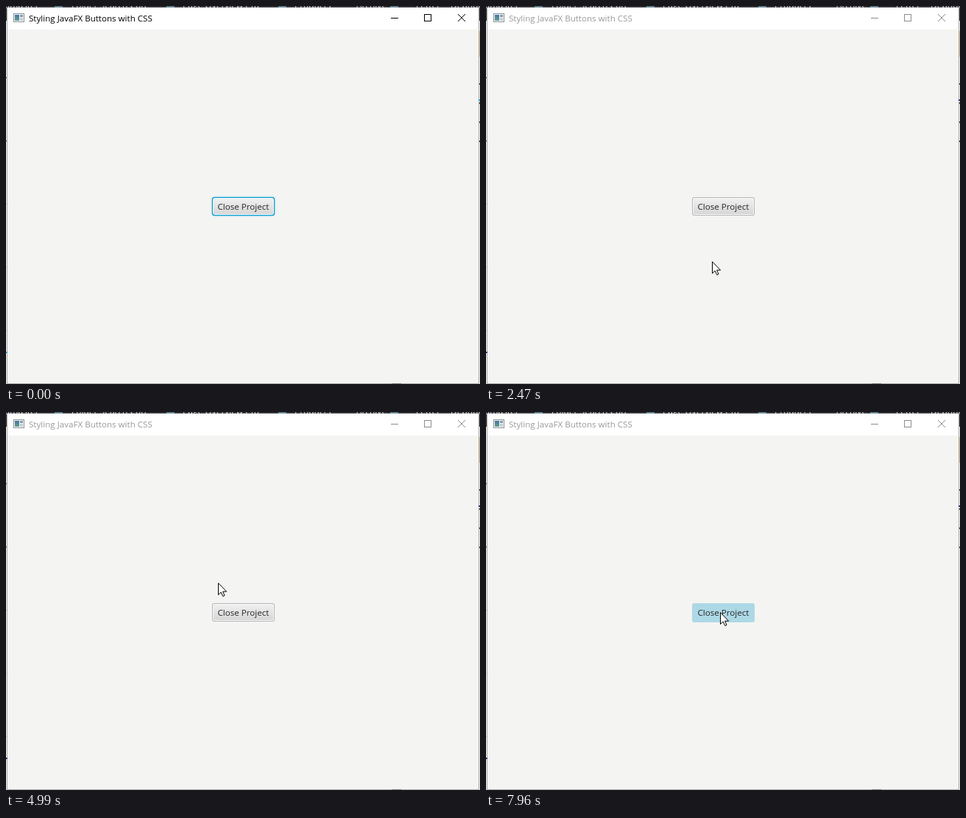
Animation, 644 px wide and 514 px high, one loop 7990 ms. Source, as an HTML page:

```html
<!DOCTYPE html>
<html lang="en">
<head>
<meta charset="utf-8">
<title>Styling JavaFX Buttons with CSS</title>
<style>
  html, body { margin: 0; width: 100%; height: 100%; overflow: hidden; background: #f4f4f2; }
  svg { display: block; width: 644px; height: 514px; font: 11.6px "Open Sans", "Noto Sans", sans-serif; }
  .title { fill: #999; }
  .controls { fill: none; stroke: #8c8c8c; }
  .focused .title { fill: #000; }
  .focused .controls { stroke: #000; }
  .accent { fill: #27467c; }
  .focused .accent { fill: #2aa5dc; }
  .ring, .hover { visibility: hidden; }
  .focused .ring, .over .hover { visibility: visible; }
  .over .plain { visibility: hidden; }
  .label { fill: #262626; }
  .behind { font-size: 12px; fill: #d6d6d6; }
</style>
</head>
<body>
<svg id="stage" class="focused" viewBox="0 0 644 514">
  <defs>
    <linearGradient id="face" x2="0" y2="1">
      <stop offset="0" stop-color="#f0f0f0"/>
      <stop offset="1" stop-color="#d6d6d6"/>
    </linearGradient>
    <linearGradient id="pane" x2="0" y2="1">
      <stop offset="0" stop-color="#3f73a6"/>
      <stop offset="1" stop-color="#5fa48f"/>
    </linearGradient>
  </defs>

  <!-- page behind the window -->
  <rect width="644" height="514" fill="#f1f1f1"/>
  <rect width="644" height="20" fill="#35363a"/>
  <g class="behind">
    <text x="-2" y="3">omaster</text>
    <text x="89" y="3">Folder Search Con</text>
    <text x="240" y="3">Page Overviews To</text>
    <text x="392" y="3">Products</text>
    <text x="476" y="3">Archive</text>
    <text x="557" y="3">Letter</text>
    <text x="604" y="3">Dephone</text>
  </g>
  <path d="M66 1h480" stroke="#62808f" stroke-width="2" stroke-dasharray="11 141"/>
  <rect x="642" y="34" width="2" height="35" fill="#d9bd91"/>

  <!-- window -->
  <rect x="1" y="2" width="642" height="512" fill="#aaa"/>
  <rect x="2" y="2" width="640" height="30" fill="#fff"/>
  <rect x="2" y="32" width="640" height="481" fill="#f4f4f2"/>
  <rect x="524" y="513" width="13" height="1" fill="#777"/>

  <!-- slivers of the page at the edges -->
  <path d="M.5 97V200" stroke="#333" stroke-dasharray="1 85"/>
  <path d="M.5 269V442" stroke="#bbb" stroke-dasharray="1 85"/>
  <path d="M643.5 105V200" stroke="#333" stroke-dasharray="2 24"/>
  <rect class="accent" x="642" y="127" width="2" height="2"/>
  <rect class="accent" y="470" width="2" height="2"/>

  <!-- title bar -->
  <rect x="10.5" y="10.5" width="14" height="11" fill="#f5f7f8" stroke="#8b9196"/>
  <rect x="12" y="12" width="6" height="8" fill="url(#pane)"/>
  <rect x="19" y="12" width="4" height="3" fill="#8c9aa5"/>
  <rect x="19" y="16" width="4" height="4" fill="#c5cdd2"/>
  <text class="title" x="31" y="21">Styling JavaFX Buttons with CSS</text>
  <g class="controls">
    <path d="M523 16.5h10"/>
    <rect x="568.5" y="11.5" width="9" height="9"/>
    <path d="M614 11l10 10M624 11l-10 10"/>
  </g>

  <!-- button -->
  <g class="plain">
    <rect x="280" y="260" width="85" height="25" rx="3" fill="#b5b5b5"/>
    <rect x="281" y="261" width="83" height="23" rx="2" fill="#fafafa"/>
    <rect x="282" y="262" width="81" height="21" rx="1" fill="url(#face)"/>
  </g>
  <g class="ring" fill="none" stroke="#039ed3" stroke-width="1.2">
    <rect x="279.2" y="259.2" width="86.6" height="26.6" rx="4" stroke-opacity=".13"/>
    <rect x="280.4" y="260.4" width="84.2" height="24.2" rx="3"/>
  </g>
  <rect class="hover" x="280" y="260" width="85" height="26" rx="3" fill="#add8e6"/>
  <text class="label" x="287.5" y="277">Close Project</text>

  <path id="pointer" d="M.5 .7V16.6L4.2 13.1L6.7 18.6L9 17.6L6.6 12.2H11.6Z" fill="#fff" stroke="#000"/>
</svg>
<script>
  const LOOP = 7990, BLUR_AT = 100, HOVER_LAG = 90;
  const ENTRY = [452, 516];

  // Strokes of the hand; "via" is the point passed halfway, straight without it.
  const moves = [
    { start: 100, end: 1620, via: [409, 380], to: [308, 275] },
    { start: 2100, end: 2600, via: [324, 318], to: [270, 384] },
    { start: 2620, end: 3000, to: [317, 275] },
    { start: 3650, end: 3970, via: [324, 297], to: [277, 320] },
    { start: 4120, end: 4500, to: [308, 275] },
    { start: 4700, end: 5200, via: [293, 237], to: [255, 210] },
    { start: 5200, end: 5600, to: [310, 268] },
    { start: 5920, end: 6300, via: [252, 302], to: [225, 313] },
    { start: 6300, end: 7020, via: [281, 300], to: [313, 272] },
    { start: 7350, end: 7420, to: [308, 272] },
    { start: 7830, end: 7960, to: [318, 272] }
  ];

  const stage = document.getElementById('stage');
  const pointer = document.getElementById('pointer');
  const begin = performance.now();

  // Quadratic curve from a to b that meets via at u = 0.5
  function curve(a, via, b, u) {
    return a + (b - a) * u + 4 * u * (1 - u) * (via - (a + b) / 2);
  }

  function tipAt(t) {
    let from = ENTRY;
    for (const { start, end, via, to } of moves) {
      if (t < start) break;
      if (t < end) {
        const u = (t - start) / (end - start);
        return from.map((a, i) =>
          Math.round(curve(a, via ? via[i] : (a + to[i]) / 2, to[i], u)));
      }
      from = to;
    }
    return from;
  }

  function overButton([x, y]) {
    return x >= 280 && x < 365 && y >= 260 && y < 286;
  }

  function draw() {
    const t = (performance.now() - begin) % LOOP;
    pointer.setAttribute('transform', `translate(${tipAt(t)})`);
    stage.classList.toggle('focused', t < BLUR_AT);
    stage.classList.toggle('over', overButton(tipAt(t - HOVER_LAG)));
    requestAnimationFrame(draw);
  }
  draw();
</script>
</body>
</html>
```
